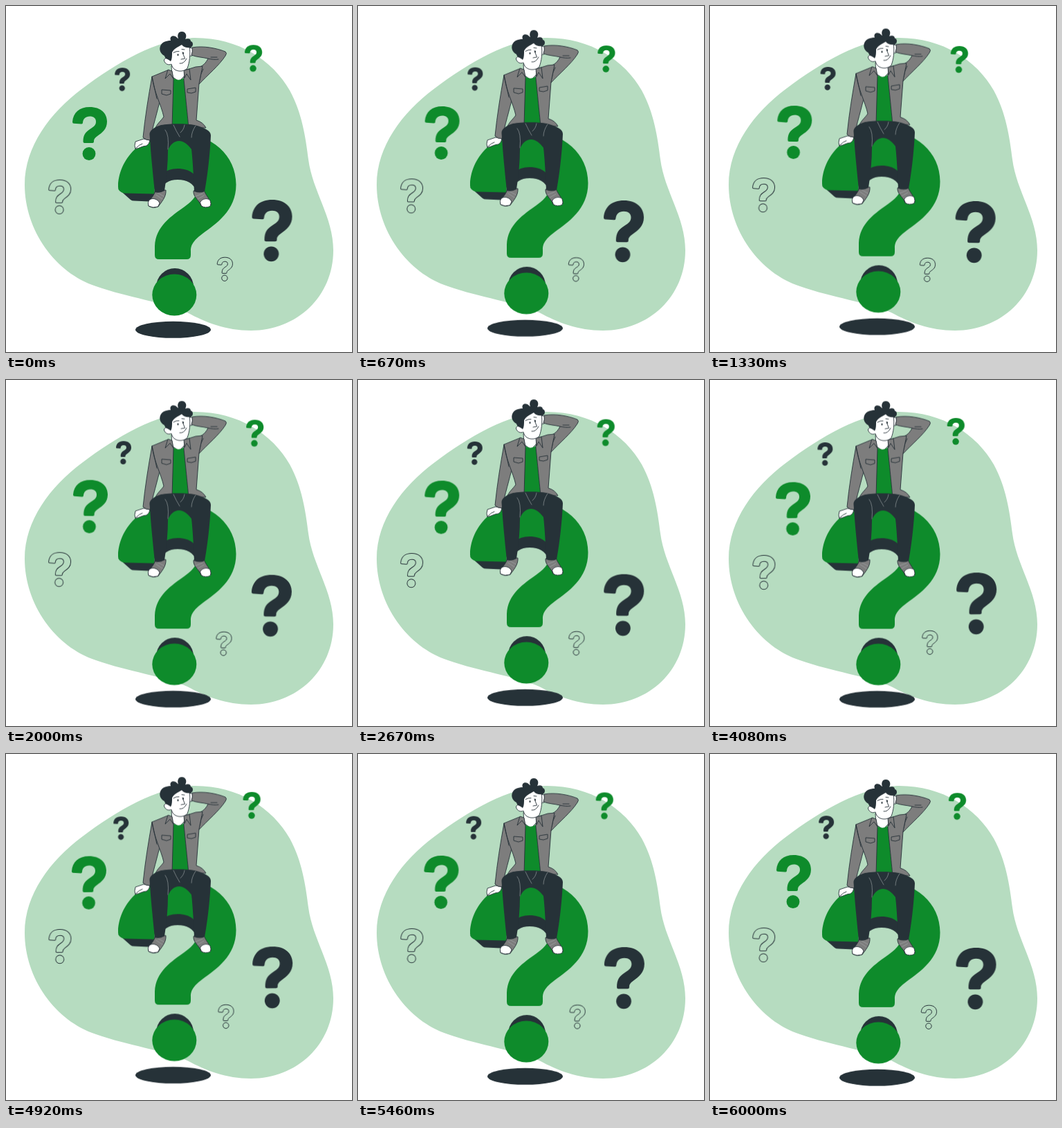
Animation, 500 px wide and 500 px high, one loop 6.04 s. Source, as an HTML page:

```html
<!DOCTYPE html>
<html lang="en">
<head>
<meta charset="utf-8">
<title>Thinking</title>
<style>
  html, body { margin: 0; width: 100%; height: 100%; overflow: hidden; background: #fff; }
  svg { display: block; width: 100vw; height: 100vh; }
  .green { fill: #0e8b2b; }
  .dark { fill: #263238; }
  .hollow { fill: none; stroke: #263238; }
  .grey, .white { stroke: #263238; stroke-width: .9; stroke-linejoin: round; }
  .grey { fill: #7d7d7d; }
  .white { fill: #fff; }
  .line { fill: none; stroke: #263238; stroke-width: .9; stroke-linecap: round; stroke-linejoin: round; }
  .crease { fill: none; stroke: #a5abae; stroke-width: .6; stroke-linecap: round; }
  #marks { transform-origin: 250px 250px; }
</style>
</head>
<body>
<svg viewBox="0 0 500 500">
  <defs>
    <g id="mark">
      <path d="M0 21.5C1 8 10 0 25 0C41 0 50 9 50 21C50 32 43 37 36 42C32 45 31 46.5 31 50Q31 52 29 52H17.5Q15.5 52 15.5 50C15.5 40 19 36 26 31.5C31.5 28 34 26 34 21C34 16 30.5 13.5 25 13.5C19 13.5 15.5 17 15 22.5Q15 24.5 13 24.4L2 23.8Q0 23.7 0 21.5Z"/>
      <circle cx="24" cy="67.5" r="9.4"/>
    </g>
  </defs>

  <path fill="#b6dcc0" d="M270 46C335 45 385 78 410 122C428 155 433 190 437 222C443 268 473 305 473 353C473 420 420 469 354 469C318 469 288 457 262 443C225 427 178 422 130 405C72 386 27 325 27 258C27 203 64 154 109.500 120C162 80.500 217 49 270 46Z"/>

  <g id="marks"></g>

  <g id="float">
    <ellipse class="dark" cx="241.5" cy="467.8" rx="54.5" ry="12"/>

    <!-- big question mark -->
    <circle class="dark" cx="244" cy="406" r="27"/>
    <ellipse class="green" cx="243.3" cy="417.5" rx="32" ry="30"/>
    <path class="dark" d="M162 264L180 280Q182 281.500 185 281.500L207 282.500L216 270Z"/>
    <path class="dark" d="M214 272C216 246 230 234 248 234C266 234 279 244 279 259L276 268C270 256 262 251 248 251C235 251 226 257 222 268Z"/>
    <path class="green" d="M170 270.500Q162 268 162 262C162 222 196 184 247 184C298 184 332.500 216 332.500 258C332.500 296 303 315 284 329C270 339.500 267 346 267 354V360Q267 366 261 366H221Q215 366 215 360V347C216 318 240 303 258 290C272 280 278 271 278 259C278 244 266 235 248 235C230 235 216 246 214 271.500Z"/>

    <!-- shoes -->
    <path class="grey" d="M216 267L231 266C232 276 224 284 220 290Q212 293 206 289C204 282 213 277 216 267Z"/>
    <path class="white" d="M206.500 281C211 276 220 279 222 285L219.500 290Q212 292.500 206 289Q204.500 284 206.500 281Z"/>
    <path class="grey" d="M271 267L286 265C288 274 296 279 296 288Q289 292 282 289C279 280 270 276 271 267Z"/>
    <path class="white" d="M280.500 284C283 278 292 277 295 281Q297 286 295 289.500Q288 292.500 282.500 289Z"/>
    <path class="crease" d="M217 273L226 279M219 270L228 275M277 279L286 274M274 275L284 271"/>

    <!-- raised arm -->
    <path class="white" d="M262 63Q266 59 270 61L269 72Q264 73 262 68Z"/>
    <path class="grey" d="M269 60C285 57 305 61 317 66Q320 68 317 72C308 86 292 99 278 114L273 91C281 88 287 86 292 76C284 74 276 74 268 71Q270 66 269 60Z"/>
    <path class="line" d="M292 76C297 77 302 78 307 77M296 74L305 74M285 91Q281 98 280 107"/>

    <!-- torso -->
    <path class="white" d="M239 86H259V100L250 109L240 102Z"/>
    <path class="green" d="M240 103Q249 110 257 104L264 175H239Z"/>
    <path class="white" d="M187 196L199 192L208 194Q207 200 203 202C197 202 193 206 187 206.500Q185 202 187 196Z"/>
    <path class="line" d="M187 206Q193 200 197 199"/>
    <path class="grey" d="M211 102C206 130 201 160 198 190Q202 194 208 194C212 175 219 152 223 134Z"/>
    <path class="grey" d="M233 93L211 102C214 125 224 142 228 160C224 166 217 171 215 179L240 175L242 105L237 94Z"/>
    <path class="grey" d="M258 93L274 88L284 87L279 112L275 165Q285 168 289 176L264 176L257 106Z"/>
    <path class="grey" d="M234 92L230 105L237 98L242 105L240 94ZM257 93L258 104L261 98L267 107L265 91Z"/>
    <path class="grey" d="M225 121L238 122V127L232 129L225 127ZM262 120L274 118L274 124L268 126L262 125Z"/>
    <path class="line" d="M211 102L218 134"/>

    <!-- jeans -->
    <path class="dark" d="M207.500 186C207 180 214 175 224 172C236 169.500 262 169.500 273 172C287 176 296 180 296 187C295 210 292 240 287 268Q280 271 272 268C271 245 270 225 268 207C262 199 256 195 250 195C243 195 238 200 234 208C234 228 232 248 229 267Q222 271 215 269C212 240 209 210 207.500 186Z"/>
    <path class="crease" d="M230 179Q236 186 234 207M242 172Q246 181 251 189M258 172Q257 179 252 183M274 173Q268 182 268 190"/>

    <!-- head -->
    <path class="white" d="M238 62V76C233 73 228 76 228.500 79C230 84 235 86 239 84C240 88 242 91 245 92.500C251 95.500 258 94 262 90C265 82 267 70 265 58L250 54Z"/>
    <path class="dark" d="M238 80C236 78 234 77 231 76C230 74 229 73 229 72C223 69 221 63 223 58C225 52 232 50 238 50C236 45 240 42 245 44C247 45 248 47 249 47C247 42 249 37 254 37C260 37 262 43 259 48C264 46 267 48 267 51C271 52 271 58 267 60C262 61 257 60 254 56C249 59 243 61 240 67C240 72 240 77 238 80Z"/>
    <path class="line" d="M242 67.500Q246 65 250 65.500M254 62.500L258 63M255 67L258.500 76L253 77M251 83Q257 84 261 76"/>
    <ellipse class="dark" cx="248.500" cy="70.500" rx="1" ry="1.600"/>
    <ellipse class="dark" cx="256" cy="68" rx="1" ry="1.600"/>
  </g>
</svg>
<script>
  const LOOP = 6040;

  // style, left, top, scale
  const MARKS = [
    ["green", 96, 146, 1],
    ["dark", 355.5, 280, 1.16],
    ["dark", 157.2, 89.2, 0.44],
    ["green", 344.9, 56.2, 0.505],
    ["hollow", 61.8, 251.3, 0.64],
    ["hollow", 305.2, 363.2, 0.445]
  ];

  // Dividing by the scale keeps every outline one pixel wide.
  document.getElementById("marks").innerHTML = MARKS.map(([style, x, y, size]) =>
    `<use href="#mark" class="${style}" stroke-width="${1 / size}" transform="translate(${x} ${y}) scale(${size})"/>`
  ).join("");

  function loop(id, steps) {
    const frames = steps.map(([offset, transform]) => ({ offset, transform }));
    const motion = document.getElementById(id).animate(frames, { duration: LOOP, iterations: Infinity });
    motion.startTime = 0;
  }

  loop("float", [
    [0, "translateY(0px)"],
    [0.5, "translateY(-10px)"],
    [1, "translateY(0px)"]
  ]);
  loop("marks", [
    [0, "rotate(0deg)"],
    [0.25, "rotate(1deg)"],
    [0.75, "rotate(-1deg)"],
    [1, "rotate(0deg)"]
  ]);
</script>
</body>
</html>
```
